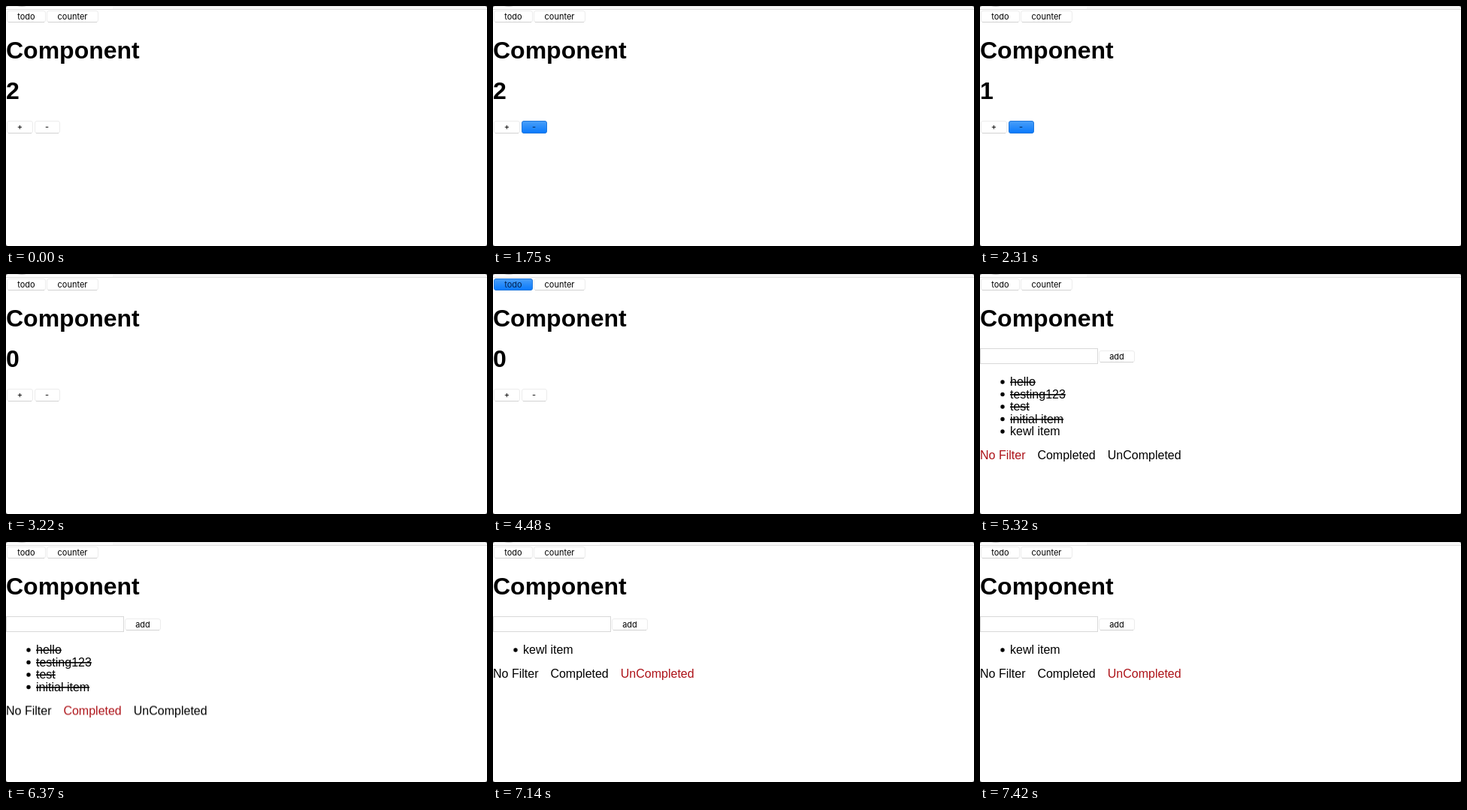
An HTML page that plays this animation: 640x320 px, repeating every 8 s.

```html
<!DOCTYPE html>
<html lang="en">
<head>
<meta charset="utf-8">
<title>Component</title>
<style>
html, body { margin: 0; width: 100%; height: 100%; overflow: hidden; background: #fff; }
svg { display: block; width: 640px; height: 320px; }
text { font: 16px "Liberation Sans", Arial, sans-serif; white-space: pre; }
.title { font-size: 32px; font-weight: bold; }
.label { font: 11px Inter, sans-serif; text-anchor: middle; }
.done { text-decoration: line-through; }
.button rect { fill: #fff; stroke: #ececec; }
.button path { stroke: #d2d2d2; }
.pressed rect { fill: url(#blue); stroke: #1f78de; }
.pressed .label { fill: #03224f; }

/* Every state change is a hard cut within one 8 s loop. */
.timed { animation: 8s step-end infinite; }
.counter { animation-name: counter; }
.two { animation-name: two; }
.one { animation-name: one; }
.zero { animation-name: zero; }
.minus-press { animation-name: minus-press; }
.todo-press { animation-name: todo-press; }
.todo { animation-name: todo; }
.completed-items { animation-name: completed-items; }
.open-item { animation-name: open-item; }
.tail { animation-name: tail; }
.filter-all { animation-name: filter-all; }
.filter-done { animation-name: filter-done; }
.filter-open { animation-name: filter-open; }

@keyframes counter { 0% { opacity: 1 } 57.75%, 100% { opacity: 0 } }
@keyframes todo { 0% { opacity: 0 } 57.75%, 100% { opacity: 1 } }
@keyframes two { 0% { opacity: 1 } 23.625%, 100% { opacity: 0 } }
@keyframes one { 0% { opacity: 0 } 23.625% { opacity: 1 } 30.625%, 100% { opacity: 0 } }
@keyframes zero { 0% { opacity: 0 } 30.625%, 100% { opacity: 1 } }
@keyframes minus-press {
  0%, 23.625%, 30.625%, 100% { opacity: 0 }
  21.875%, 28.875% { opacity: 1 }
}
@keyframes todo-press { 0%, 57.75%, 100% { opacity: 0 } 56% { opacity: 1 } }
@keyframes completed-items { 0% { opacity: 1 } 89.25%, 100% { opacity: 0 } }
@keyframes open-item { 0%, 89.25%, 100% { opacity: 1 } 72.625% { opacity: 0 } }
@keyframes tail {
  0% { transform: translateY(0) }
  72.625% { transform: translateY(-16.5px) }
  89.25%, 100% { transform: translateY(-66px) }
}
@keyframes filter-all { 0% { fill: #ad1218 } 72.625%, 100% { fill: #000 } }
@keyframes filter-done { 0%, 89.25%, 100% { fill: #000 } 72.625% { fill: #ad1218 } }
@keyframes filter-open { 0% { fill: #000 } 89.25%, 100% { fill: #ad1218 } }
</style>
</head>
<body>
<svg viewBox="0 0 640 320">
  <defs>
    <linearGradient id="blue" x2="0" y2="1">
      <stop stop-color="#4a9ff8"/>
      <stop offset="1" stop-color="#0879fc"/>
    </linearGradient>
  </defs>

  <!-- Window edge -->
  <path d="M142 0H640V4H142Z" fill="#f8f8f8"/>
  <path d="M0 .5H640" stroke="#e6e6e6"/>
  <path d="M0 4.5H640" stroke="#dedede"/>
  <path d="M15 0H27Q21 1.6 15 0Z" fill="#aaa"/>
  <path d="M0 0H2L0 2ZM640 0H638L640 2ZM0 320V318L2 320ZM640 320V318L638 320Z" fill="#777"/>

  <g class="button">
    <rect x="1.5" y="6.5" width="51" height="15" rx="2.5"/>
    <path d="M3 21.5H51"/>
    <text class="label" x="27" y="17.5">todo</text>
  </g>
  <g class="button">
    <rect x="54.5" y="6.5" width="68" height="15" rx="2.5"/>
    <path d="M56 21.5H121"/>
    <text class="label" x="88.5" y="17.5">counter</text>
  </g>
  <g class="pressed timed todo-press">
    <rect x="1.5" y="6.5" width="51" height="15" rx="2.5"/>
    <text class="label" x="27" y="17.5">todo</text>
  </g>
  <text class="title" x="0" y="70">Component</text>

  <g class="timed counter">
    <text class="title timed two" x="0" y="124">2</text>
    <text class="title timed one" x="0" y="124">1</text>
    <text class="title timed zero" x="0" y="124">0</text>
    <g class="button">
      <rect x="1.5" y="153.5" width="34" height="16" rx="2.5"/>
      <path d="M3 169.5H34"/>
      <text class="label" x="18.5" y="165">+</text>
    </g>
    <g class="button">
      <rect x="38.5" y="153.5" width="33" height="16" rx="2.5"/>
      <path d="M40 169.5H70"/>
      <text class="label" x="54.5" y="165">-</text>
    </g>
    <g class="pressed timed minus-press">
      <rect x="38.5" y="153.5" width="33" height="16" rx="2.5"/>
      <text class="label" x="54.5" y="165">-</text>
    </g>
  </g>

  <g class="timed todo">
    <rect x=".5" y="99.5" width="156" height="20" fill="#fff" stroke="#d8d8d8"/>
    <g class="button">
      <rect x="158.5" y="102.5" width="47" height="15" rx="2.5"/>
      <path d="M160 117.5H204"/>
      <text class="label" x="182" y="113.5">add</text>
    </g>
    <g class="timed completed-items">
      <circle cx="30" cy="144" r="2.7"/>
      <circle cx="30" cy="160.5" r="2.7"/>
      <circle cx="30" cy="177" r="2.7"/>
      <circle cx="30" cy="193.5" r="2.7"/>
      <text class="done" x="40" y="149">hello</text>
      <text class="done" x="40" y="165.5">testing123</text>
      <text class="done" x="40" y="182">test</text>
      <text class="done" x="40" y="198.5">initial item</text>
    </g>
    <g class="timed tail">
      <g class="timed open-item">
        <circle cx="30" cy="210" r="2.7"/>
        <text x="40" y="215">kewl item</text>
      </g>
      <text class="timed filter-all" x="0" y="247">No Filter</text>
      <text class="timed filter-done" x="76.4" y="247">Completed</text>
      <text class="timed filter-open" x="169.8" y="247">UnCompleted</text>
    </g>
  </g>
</svg>
</body>
</html>
```
